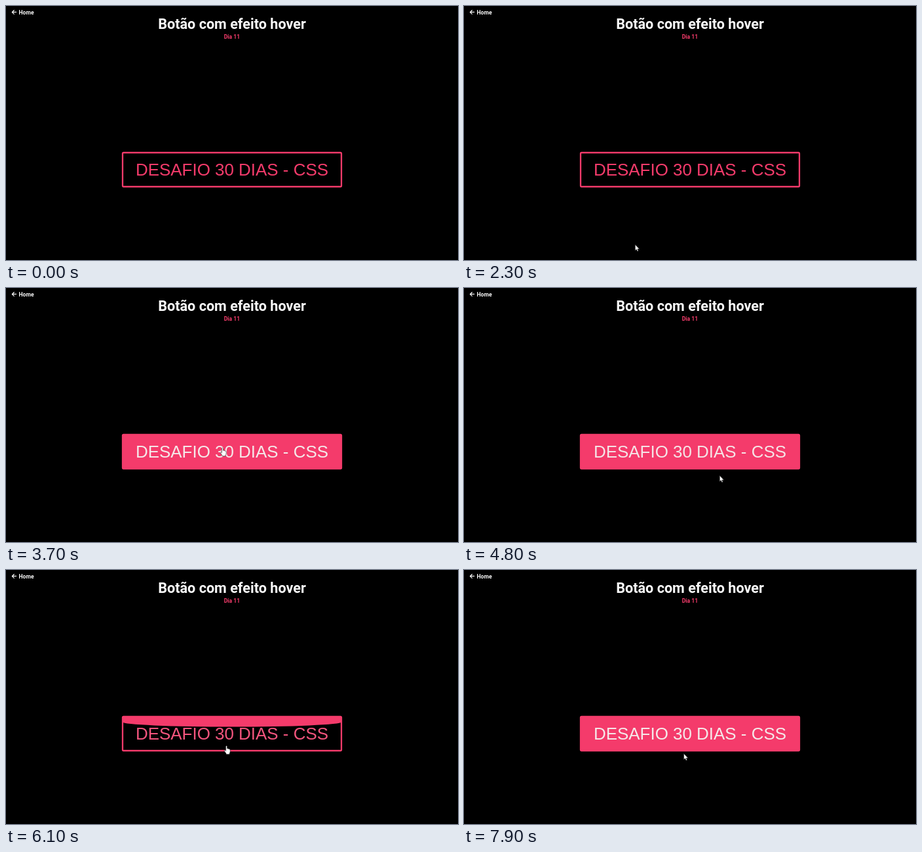
Recreate the animation shown at these times as an HTML page. Size 690 by 388 pixels, loop 8000 ms.

```html
<!DOCTYPE html>
<html lang="pt">
<head>
<meta charset="utf-8">
<title>Botão com efeito hover</title>
<style>
  html, body { margin: 0; width: 100%; height: 100%; overflow: hidden; background: #000; }
  svg { display: block; width: 690px; height: 388px; }
  .heading { font-family: Roboto, sans-serif; font-weight: 700; fill: #fafafa; }
  .small { font-size: 8.6px; }
  .label { font: 25.95px "Liberation Sans", Arial, sans-serif; }
  .centered { text-anchor: middle; }
</style>
</head>
<body>
<svg viewBox="0 0 690 388">
  <clipPath id="inside"><rect x="178" y="224" width="334" height="52" rx="1.5"/></clipPath>

  <path d="M16 9.4H9.6M12.6 6.2L9.4 9.4L12.6 12.6" fill="none" stroke="#fafafa" stroke-width="1.3"/>
  <text class="heading small" x="19.5" y="12.6">Home</text>
  <text class="heading centered" x="345" y="35.1" font-size="21.6">Botão com efeito hover</text>
  <text class="heading small centered" x="345" y="50.3" style="fill:#f43b6b">Dia 11</text>

  <path id="fill" fill="#f43b6b" clip-path="url(#inside)"/>
  <rect x="178" y="224" width="334" height="52" rx="1.5" fill="none" stroke="#f43b6b" stroke-width="2.3"/>
  <text id="label" class="label centered" x="345" y="259">DESAFIO 30 DIAS - CSS</text>

  <g id="cursor" fill="#fff" stroke="#222" stroke-width=".6" stroke-linejoin="round">
    <path id="arrow" d="M0 0V9L2 7.2L3.4 10.3L4.9 9.6L3.6 6.7H6.4Z"/>
    <path id="hand" d="M-1 .8Q0 -.8 1 .8V4.2Q2 3.6 2.8 4.6Q3.8 4.2 4.4 5.2Q5.6 5 5.6 6.4V9Q5.4 10.5 4.6 11.4V12.8H-.6V11.6L-3.4 7.6Q-3.2 6.2 -1.8 7L-1 7.8Z"/>
  </g>
</svg>
<script>
const LOOP = 8000, STEP = 100, FADE = 500;
const HOVERS = [{ enter: 3300, leave: 4768 }, { enter: 6035, leave: 7880 }];
// The pointer glides in from the corner, visits the button, drops away and returns.
const STOPS = [
  { t: 1200, x: 2, y: 358 },
  { t: 2300, x: 261.3, y: 364.5 },
  { t: 2900, x: 326, y: 340 },
  { t: 3700, x: 330.5, y: 244 },
  { t: 4800, x: 390.3, y: 286.6 },
  { t: 5100, x: 344.2, y: 338.8 },
  { t: 6100, x: 336.6, y: 268.6 },
  { t: 7900, x: 335.6, y: 280.6 }
];
const $ = id => document.getElementById(id);
const mix = (a, b, p) => a + (b - a) * p;
const clamp = p => Math.min(1, Math.max(0, p));

// The CSS "ease" curve, cubic-bezier(.25, .1, .25, 1), solved by bisection
function ease(p) {
  const bezier = (a, b, u) => 3 * a * u * (1 - u) ** 2 + 3 * b * u * u * (1 - u) + u ** 3;
  let low = 0, high = 1;
  for (let i = 0; i < 24; i++) {
    const mid = (low + high) / 2;
    if (bezier(.25, .25, mid) < p) low = mid; else high = mid;
  }
  return bezier(.1, 1, high);
}
const fade = (t, from) => ease(clamp((t - from) / FADE));

function pointerAt(t) {
  const next = Math.max(1, STOPS.findIndex(stop => stop.t >= t));
  const a = STOPS[next - 1], b = STOPS[next];
  const p = clamp((t - a.t) / (b.t - a.t));
  return [mix(a.x, b.x, p), mix(a.y, b.y, p)];
}

function draw(t) {
  const amount = HOVERS.reduce((sum, { enter, leave }) => sum + fade(t, enter) - fade(t, leave), 0);
  const half = 50 * amount, edge = 225 + half;
  $('fill').setAttribute('d', half < .01 ? '' : `M178 224V${edge}A167 ${half} 0 0 0 512 ${edge}V224Z`);
  $('label').style.fill = `color-mix(in srgb, #f5ecec ${amount * 100}%, #f43b6b)`;

  const hovering = HOVERS.some(({ enter, leave }) => t >= enter && t < leave);
  $('cursor').setAttribute('visibility', t < STOPS[0].t ? 'hidden' : 'visible');
  $('cursor').setAttribute('transform', `translate(${pointerAt(t)})`);
  $('arrow').style.display = hovering ? 'none' : '';
  $('hand').style.display = hovering ? '' : 'none';
}

const start = performance.now();
function tick() {
  const t = (performance.now() - start) % LOOP;
  draw(Math.floor(t / STEP) * STEP);
  requestAnimationFrame(tick);
}
tick();
</script>
</body>
</html>
```
